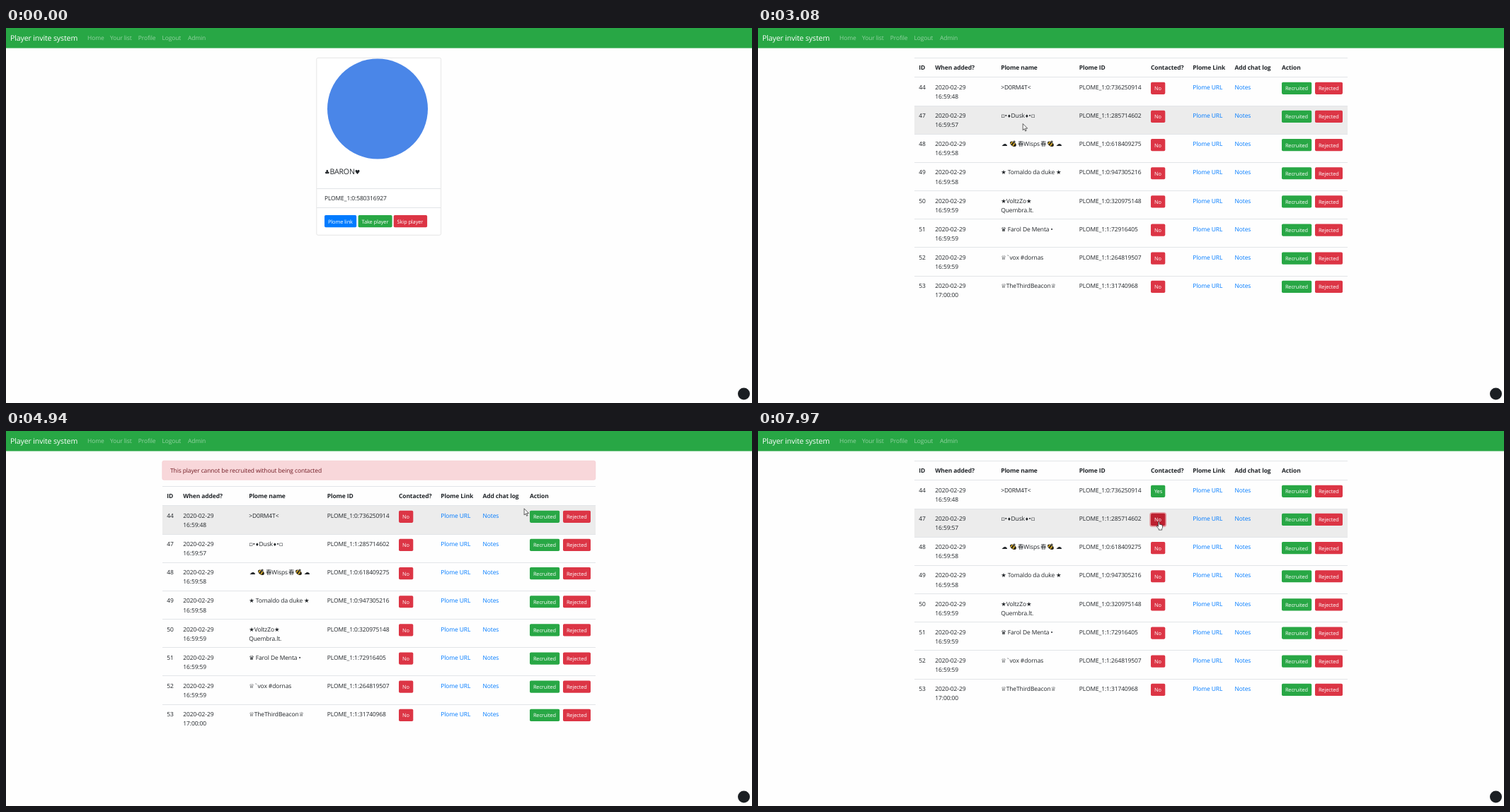
Animation of 1054x531 px, one loop 8 s. Source, as an HTML page:

```html
<!DOCTYPE html>
<html lang="en">
<head>
<meta charset="utf-8">
<title>Player invite system</title>
<style>
  html, body { margin: 0; width: 100%; height: 100%; overflow: hidden; background: #fefefe; }
  svg { display: block; width: 1054px; height: 531px; }
  text {
    font: 8.47px "Open Sans", "Noto Sans", "DejaVu Sans", "Noto Sans CJK SC", "Noto Sans CJK JP", sans-serif;
    letter-spacing: -.0132em; fill: #212529; white-space: pre; text-rendering: geometricPrecision;
  }
  .brand { font-size: 10.6px; fill: #fff; }
  .nav { fill: rgba(255,255,255,.5); }
  .nav.hover { fill: rgba(255,255,255,.8); }
  .title { font-size: 10.6px; font-weight: 500; }
  .title tspan { font-size: 8.4px; }
  .small { font-size: 6.4px; }
  .head { font-weight: 700; }
  .link { fill: #007bff; }
  .warn { fill: #721c24; }
  .status { font-size: 6.1px; fill: #80868b; }
  .line { fill: #e2e5e8; shape-rendering: crispEdges; }
  .shade { fill: #ececec; shape-rendering: crispEdges; visibility: hidden; }
  .shade.on { visibility: visible; }
  .btn text { font-size: 7.42px; fill: #fff; }
  .btn rect { paint-order: stroke; }
  .blue rect { fill: #007bff; }
  .green rect { fill: #28a745; }
  .red rect { fill: #dc3545; }
  .green.hover rect { fill: #218838; }
  .red.hover rect { fill: #c82333; }
  .btn.press rect { stroke-width: 3.4px; }
  .green.press rect { fill: #1e7e34; stroke: rgba(40,167,69,.5); }
  .red.press rect { fill: #bd2130; stroke: rgba(220,53,69,.5); }
  .cursor path { fill: #fff; stroke: #111; stroke-width: 1.2; stroke-linejoin: round; }
</style>
</head>
<body>
<svg id="stage" viewBox="0 0 1054 531" xmlns="http://www.w3.org/2000/svg"></svg>
<script>
const LOOP = 8000, TOP = 70, ROW = 40.15, SHIFT = 36;
const LEFT = 221, WIDTH = 612;

const text = (x, y, s, cls = '') => `<text x="${x}" y="${y}" class="${cls}">${s}</text>`;
const rect = (x, y, w, h, rest = '') => `<rect x="${x}" y="${y}" width="${w}" height="${h}" ${rest}/>`;
const line = (x, y, w) => rect(x, Math.floor(y), w, 1, 'class="line"');
const btn = (x, y, w, label, cls) =>
  `<g class="btn ${cls}">${rect(x, y, w, 17.2, 'rx="1.8"')}${text(x + 4.9, y + 11.6, label)}</g>`;
const bee = (x, y) =>
  `<g transform="translate(${x} ${y}) rotate(35)"><ellipse rx="5" ry="3" fill="#2b2618"/>` +
  '<path d="M-2.6-2v4M1-2.4v4.8" stroke="#e8b82a" stroke-width="1.5"/>' +
  '<ellipse cx="-.5" cy="-3.2" rx="1.6" ry="1.8" fill="#55544c"/></g>';

const diamond = '<tspan class="small">♦</tspan>';
const at = (x, s) => `<tspan x="${x}">${s}</tspan>`;
const players = [
  [44, '16:59:48', '&gt;D0RM4T&lt;', '0:736250914'],
  [47, '16:59:57', `▫•${diamond}Dusk${diamond}•▫`, '1:285714602'],
  [48, '16:59:58', at(344, '☁') + at(367, '春Wisps') + at(399, '春') + at(421, '☁'), '0:618409275'],
  [49, '16:59:58', '★ Tomaldo da duke ★', '0:947305216'],
  [50, '16:59:59', '★VoltzZo★', '0:320975148', 'Quembra.lt.'],
  [51, '16:59:59', '♛ Farol De Menta •', '1:72916405'],
  [52, '16:59:59', '♕`vox #dornas', '1:264819507'],
  [53, '17:00:00', '♕TheThirdBeacon♕', '1:31740968'],
];

function row([id, time, name, number, second = ''], i) {
  const y = TOP + i * ROW, base = y + 16.9, next = base + 13.2, by = y + 6.7;
  return rect(LEFT, Math.floor(y), WIDTH, 40, 'class="shade"') +
    (i ? line(LEFT, y, WIDTH) : '') +
    text(227.3, base, id) + text(250.3, base, '2020-02-29') + text(250.3, next, time) +
    text(343.2, base, name) + text(343.2, next, second) +
    (id === 48 ? bee(360.5, base - 3) + bee(413.5, base - 3) : '') +
    text(453.8, base, 'PLOME_1:' + number) +
    btn(555, by, 20.3, 'No', 'red contact') +
    text(614.3, base, 'Plome URL', 'link') + text(673.5, base, 'Notes', 'link') +
    btn(740, by, 42.2, 'Recruited', 'green recruit') + btn(787, by, 39, 'Rejected', 'red');
}

const heads = [[227.3, 'ID'], [250.3, 'When added?'], [343.2, 'Plome name'], [453.8, 'Plome ID'],
  [555, 'Contacted?'], [614.3, 'Plome Link'], [673.5, 'Add chat log'], [740, 'Action']];
const links = [[115, 'Home'], [147, 'Your list'], [186.8, 'Profile'], [220.4, 'Logout'], [257, 'Admin']];

const card = rect(438.8, 42.3, 175.8, 251, 'rx="2.2" fill="#fff" stroke="#dfdfdf" stroke-width=".8"') +
  '<circle cx="525" cy="114.5" r="71" fill="#4a86e8"/>' +
  text(450, 207, '<tspan>♣</tspan>BARON<tspan>♥</tspan>', 'title') +
  line(439, 227, 175) + text(450, 244.2, 'PLOME_1:0:580316927') + line(439, 254, 175) +
  btn(450, 265, 45.2, 'Plome link', 'blue') + btn(497.6, 265, 48, 'Take player', 'green') +
  btn(547.7, 265, 47.4, 'Skip player', 'red');

const $ = s => document.querySelector(s), all = s => [...document.querySelectorAll(s)];

$('#stage').innerHTML =
  rect(0, 0, 1054, 28.5, 'fill="#28a745"') +
  text(6, 18, 'Player invite system', 'brand') +
  links.map(([x, s]) => text(x, 16.9, s, 'nav')).join('') +
  `<g id="card">${card}</g>` +
  `<g id="alert">${rect(220.8, 42.2, 612, 27, 'rx="2.2" fill="#f8d7da" stroke="#f5c6cb" stroke-width=".6"')}` +
  text(232, 59.2, 'This player cannot be recruited without being contacted', 'warn') + '</g>' +
  `<g id="table">${line(LEFT, 42, WIDTH)}${heads.map(([x, s]) => text(x, 59.2, s, 'head')).join('')}` +
  players.map(row).join('') + line(LEFT, 69, WIDTH) + '</g>' +
  `<g id="status">${text(0, 527.5, 'test.domain24.lt/list', 'status')}</g>` +
  '<circle cx="1042.5" cy="518" r="8.5" fill="#1b1f23"/>' +
  '<g class="cursor" id="cursor">' +
  '<path id="arrow" transform="scale(.55)" d="M0 0V16.5L3.8 13L6.4 19L9 17.8L6.4 12H11.8Z"/>' +
  '<path id="hand" transform="scale(.55) translate(-6 0)" d="M5 2Q6.5-.4 8 2V8Q9.5 6.8 10.8 8.4Q12.5 7.4 13.6 9.2Q16 8.6 16 11V16Q15.5 18 14.5 19V22H6.5V19.5L1 13Q.2 10.6 2.4 11L5 13.4Z"/></g>';

const nav = all('.nav')[1], shades = all('.shade');
const contacts = all('.contact'), recruits = all('.recruit');

// Pointer path: time, x, y
const path = [
  [140, 988, 514], [910, 187, 33], [1330, 462, 174], [1745, 171, 31.5], [1823, 164, 25],
  [1895, 159.2, 20.3], [2060, 159.2, 20.3], [2150, 159.2, 18], [2300, 165, 24],
  [2843, 328.6, 110], [3080, 375, 136], [3310, 440, 165], [3619, 555, 101], [3930, 700, 93],
  [4160, 773.6, 88], [4560, 773.6, 88], [4780, 766, 108], [5640, 582, 118],
  [6020, 566, 125.5], [6500, 566, 126], [6740, 571, 104], [7000, 567, 88],
  [7200, 569, 99], [7400, 568, 107], [7660, 566, 120], [7890, 566, 128], [8000, 566, 128],
];

function tick(t) {
  const grid = (start, step) => start + Math.floor((t - start + 3) / step) * step;
  if (t < 1900) return grid(140, 76.5);
  if (t < 2300) return t < 2060 ? 1900 : t < 2150 ? 2060 : 2150;
  return grid(2300, 77.6);
}

function pointer(t) {
  const k = Math.max(1, path.findIndex(p => p[0] >= t));
  const [a, b] = [path[k - 1], path[k]];
  const f = Math.min(1, Math.max(0, (t - a[0]) / (b[0] - a[0])));
  return [a[1] + (b[1] - a[1]) * f, a[2] + (b[2] - a[2]) * f];
}

const show = (el, on) => el.style.display = on ? '' : 'none';
const within = (t, a, b) => t >= a && t < b;

function render(t) {
  const [x, y] = pointer(tick(t));
  const listed = t >= 2300, warned = within(t, 4560, 6345), contacted = t >= 6345;
  const shift = warned ? SHIFT : 0;
  show($('#card'), !listed);
  show($('#table'), listed);
  show($('#alert'), warned);
  $('#table').setAttribute('transform', `translate(0 ${shift})`);

  const depth = y - TOP - shift, index = Math.floor(depth / ROW);
  const over = listed && depth >= 0 && x >= LEFT && x <= LEFT + WIDTH ? index : -1;
  const inset = depth - index * ROW;
  const onButton = over >= 0 && within(inset, 6.7, 23.9);
  const onContact = onButton && within(x, 555, 575.3);
  const onRecruit = onButton && within(x, 740, 782.2);
  const onNav = t > 140 && within(x, 147, 178) && y < 26;

  nav.classList.toggle('hover', onNav);
  shades.forEach((s, i) => s.classList.toggle('on', i === over));
  const recruiting = within(t, 4320, 4560);
  const contacting = within(t, 6180, 6345) || t >= 7880;
  const mark = (list, hit, press) => list.forEach((b, i) => {
    b.classList.toggle('hover', hit && i === over);
    b.classList.toggle('press', hit && press && i === over);
  });
  mark(contacts, onContact, contacting);
  mark(recruits, onRecruit, recruiting);

  contacts[0].classList.toggle('green', contacted);
  contacts[0].classList.toggle('red', !contacted);
  contacts[0].querySelector('text').textContent = contacted ? 'Yes' : 'No';

  const fade = 1 - Math.min(1, Math.max(0, (t - 2600) / 320));
  $('#status').setAttribute('opacity', t < 2060 ? 0 : fade);

  const hand = onNav || onContact || (onRecruit && !recruiting);
  show($('#cursor'), t >= 140);
  show($('#hand'), hand);
  show($('#arrow'), !hand);
  $('#cursor').setAttribute('transform', `translate(${x.toFixed(2)} ${y.toFixed(2)})`);
}

const begin = performance.now();
function frame() {
  render((performance.now() - begin) % LOOP);
  requestAnimationFrame(frame);
}
frame();
</script>
</body>
</html>
```
